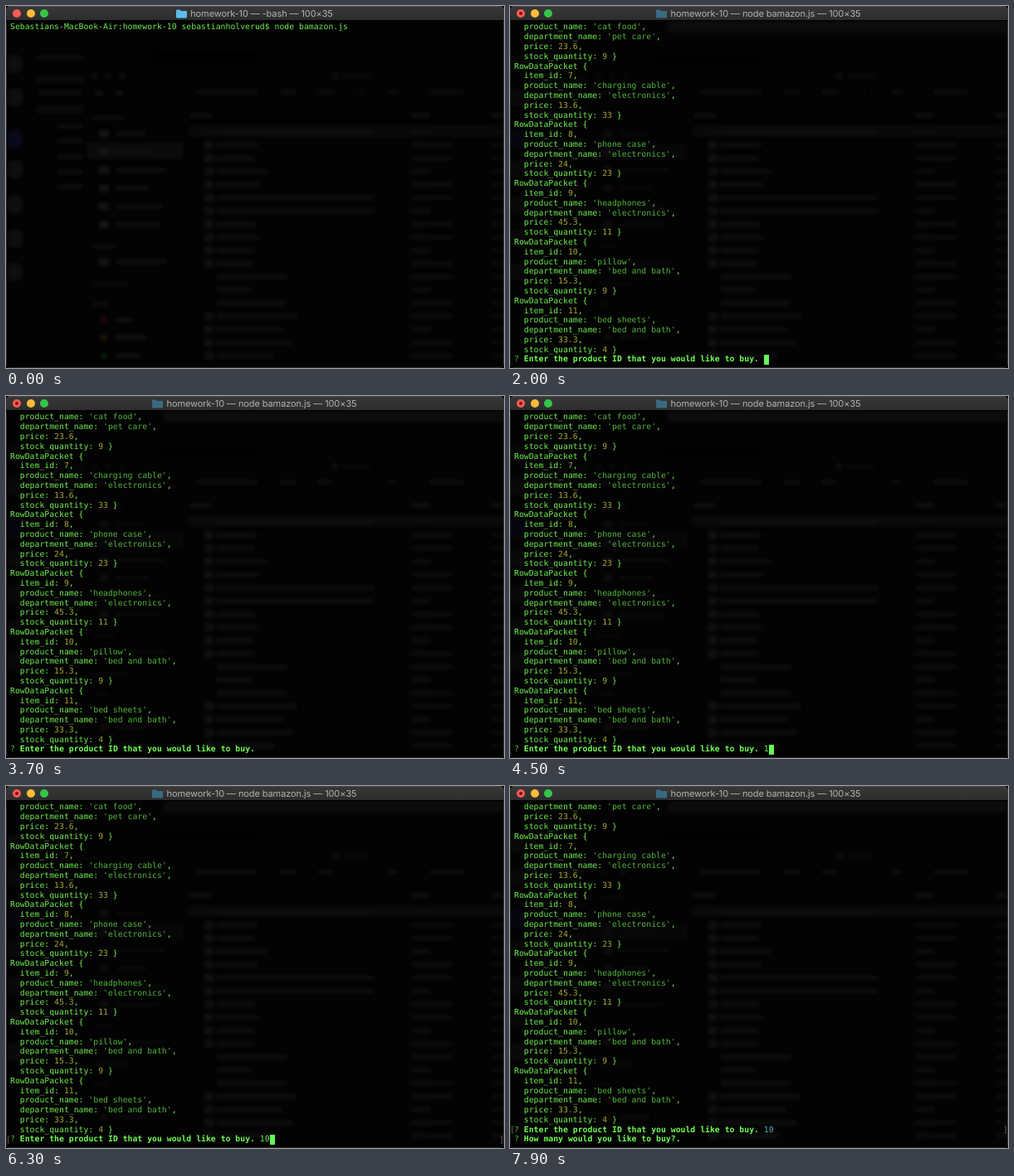
An HTML page that plays this animation: 600 by 437 pixels, repeating every 8000 ms.

```html
<!DOCTYPE html>
<html lang="en">
<head>
<meta charset="utf-8">
<title>Terminal</title>
<style>
  html, body { margin: 0; width: 100%; height: 100%; overflow: hidden; background: #000; }
  #win {
    position: absolute; left: 0; top: 0; width: 600px; height: 437px;
    box-sizing: border-box; overflow: hidden; background: #040304; border-radius: 5px;
  }
  #back { position: absolute; left: 0; top: 0; }
  #edge {
    position: absolute; inset: 0; box-sizing: border-box;
    border: 1px solid #282828; border-radius: 5px;
  }
  #bar {
    position: absolute; left: 0; top: 0; width: 600px; height: 17px;
    background: linear-gradient(#383838, #2d2d2d);
    box-shadow: inset 0 1px #484848, 0 1px #000;
  }
  #title {
    position: absolute; left: 0; right: 1px; top: 1px; height: 17px;
    display: flex; align-items: center; justify-content: center; gap: 4px;
    font: 11px/17px Inter, Roboto, sans-serif; letter-spacing: -.1px; color: #b0b0b0;
    white-space: pre; text-rendering: geometricPrecision;
  }
  .light { position: absolute; top: 3.5px; width: 10px; height: 10px; border-radius: 50%; }
  #dot { position: absolute; left: 3px; top: 3px; width: 4px; height: 4px; border-radius: 50%; background: #7a0a08; }
  #text, #cursor, .mark {
    position: absolute; margin: 0; white-space: pre;
    font: 9.8px/11.8px "DejaVu Sans Mono", "Liberation Mono", monospace;
    text-rendering: geometricPrecision; font-variant-ligatures: none;
  }
  #text { left: 5px; top: 20.4px; color: #6eea50; }
  #cursor { width: 6px; height: 12px; background: #66f858; }
  .mark { color: #666a60; }
  .s { color: #4fb43a; }
  .n { color: #a3a436; }
  .a { color: #4fb4b8; }
  b { color: #70fa54; }
</style>
</head>
<body>
<div id="win">
  <svg id="back" width="600" height="437">
    <filter id="blur" x="-5%" y="-5%" width="110%" height="110%" color-interpolation-filters="sRGB">
      <feGaussianBlur stdDeviation="2"/>
    </filter>
    <g id="left" filter="url(#blur)"></g>
    <g id="right" filter="url(#blur)" opacity=".6"></g>
    <rect id="band" x="190" y="17" width="410" height="15" fill="#0d0c0d" filter="url(#blur)"/>
  </svg>
  <pre id="text"></pre>
  <div id="cursor"></div>
  <div class="mark" style="left:0">[</div>
  <div class="mark" style="left:594px">]</div>
  <div id="edge"></div>
  <div id="bar">
    <div class="light" style="left:8px;background:#fc5b54"><div id="dot"></div></div>
    <div class="light" style="left:25px;background:#fdbc37"></div>
    <div class="light" style="left:41px;background:#35c648"></div>
    <div id="title">
      <svg width="13" height="11"><path id="folder" d="M0 1.5Q0 .5 1 .5H4.5L6 2H12Q13 2 13 3V9.5Q13 10.5 12 10.5H1Q0 10.5 0 9.5Z"/></svg>
      <span id="name"></span>
    </div>
  </div>
</div>
<script>
const LOOP = 8000, CELL = 5.9, ROW = 11.8, ROWS = 35, BLINK = 610;
const ENTER = 1200, TITLE = 1300, LIST = 1700, KEY1 = 4000, KEY2 = 4700, SEND = 6200, NEXT = 6800;
const WAKES = [190, ENTER, LIST, KEY1, KEY2, SEND, NEXT];
const $ = id => document.getElementById(id);
const marks = document.querySelectorAll('.mark');

// Dim, blurred file browser showing through the window
const rect = (x, y, w, h, c, r = 2) =>
  `<rect x="${x}" y="${y - h / 2}" width="${w}" height="${h}" rx="${r}" fill="${c}"/>`;
const smudge = (x, y, w, c = '#1b191b') => rect(x, y, w, 5, c);

function paintBack() {
  let l = '', r = '';
  [70, 110, 160, 197, 240, 281, 321].forEach((y, i) => l += rect(1, y, 19, 22, i == 2 ? '#0c0d24' : '#151415', 8));
  [62, 88, 105, 125, 145, 163, 182, 200, 218].forEach((y, i) =>
    l += smudge(i < 4 ? 37 : 62, y, i < 4 ? 56 - i % 2 * 12 : 31, '#141214'));
  [88, 125].forEach(y => l += rect(36, y, 58, 10, '#0e0d0e'));
  [107, 123, 140].forEach(x => l += rect(x - 4, 85, 8, 8, '#111', 4));
  l += rect(98, 175, 115, 19, '#101011') + rect(175, 64, 130, 20, '#000');
  l += smudge(107, 105, 11) + smudge(132, 105, 9);
  [135, 290, 336, 360].forEach((y, i) => l += smudge(104, y, [38, 28, 44, 20][i], '#121112'));
  [154, 175, 198, 220, 242, 264, 309].forEach((y, i) =>
    l += rect(112, y, 12, 9, '#1d1c1d') + smudge(132, y, [36, 42, 60, 40, 56, 54, 62][i], '#161516'));
  [379, 400, 422].forEach((y, i) =>
    l += rect(114, y, 8, 8, ['#2c1210', '#2a1c0c', '#10230f'][i], 4) + smudge(132, y, [20, 37, 30][i]));

  r += rect(392, 85, 9, 9, '#141314') + smudge(406, 85, 34, '#0f0e0f');
  [[224, 84], [325, 30], [370, 30], [420, 14], [455, 22], [505, 52]].forEach(([x, w]) =>
    r += smudge(x + 5, 104, w - 10, '#151415'));
  r += smudge(221, 132, 27) + smudge(488, 132, 22) + smudge(585, 132, 15);
  r += rect(220, 151, 380, 13, '#0f0e0f');
  const widths = [190, 50, 46, 62, 52, 190, 190, 48, 52, 46, 46, 86, 42, 84, 97, 80, 92, 70];
  widths.forEach((w, i) => {
    const y = 152 + i * 15.9;
    if (i < 11 || i > 13) r += rect(239, y, 11, 10, i ? '#1a191a' : '#121112');
    r += smudge(253, y, w, '#171617') + smudge(488, y, i % 3 ? 50 : 24, '#151415') + smudge(585, y, 15, '#121112');
  });
  $('left').innerHTML = l;
  $('right').innerHTML = r;
}

// Terminal contents
const str = s => `<span class="s">'${s}'</span>`;
const num = n => `<span class="n">${n}</span>`;
const ask = s => `<span class="s">?</span> <b>${s}</b> `;
const ITEMS = [
  [6, 'cat food', 'pet care', 23.6, 9],
  [7, 'charging cable', 'electronics', 13.6, 33],
  [8, 'phone case', 'electronics', 24, 23],
  [9, 'headphones', 'electronics', 45.3, 11],
  [10, 'pillow', 'bed and bath', 15.3, 9],
  [11, 'bed sheets', 'bed and bath', 33.3, 4],
];
const packets = ITEMS.flatMap(([id, name, dept, price, stock]) => [
  'RowDataPacket {',
  `  item_id: ${num(id)},`,
  `  product_name: ${str(name)},`,
  `  department_name: ${str(dept)},`,
  `  price: ${num(price)},`,
  `  stock_quantity: ${num(stock)} }`,
]);
const COMMAND = 'Sebastians-MacBook-Air:homework-10 sebastianholverud$ node bamazon.js ';
const ASK_ID = ask('Enter the product ID that you would like to buy.');
const ASK_COUNT = ask('How many would you like to buy?.');

// Lines, cursor cell and row of the bracket marks at time t
function screen(t) {
  if (t < LIST) {
    return t < ENTER ? { lines: [COMMAND], col: COMMAND.length, row: 0, mark: -1 }
                     : { lines: [COMMAND], col: 0, row: 1, mark: 0 };
  }
  const last = ROWS - 1;
  if (t >= NEXT) {
    const lines = [...packets, ASK_ID + '<span class="a">10</span>', ASK_COUNT];
    return { lines: lines.slice(-ROWS), col: 35, row: last, mark: last - 1 };
  }
  const typed = t < KEY1 ? '' : t < KEY2 ? '1' : '10';
  return {
    lines: [...packets, ASK_ID + typed].slice(-ROWS),
    col: 51 + typed.length, row: last, mark: t < SEND ? -1 : last,
  };
}

function cursorOn(t) {
  const wake = WAKES.filter(w => w <= t).pop();
  return wake !== undefined && Math.floor((t - wake) / BLINK) % 2 == 0;
}

let shown = '';
function draw(now) {
  const t = now % LOOP;
  const { lines, col, row, mark } = screen(t);
  const html = lines.join('\n');
  if (html != shown) $('text').innerHTML = shown = html;

  const cur = $('cursor').style;
  cur.left = 5 + col * CELL + 'px';
  cur.top = 19.8 + row * ROW + 'px';
  cur.visibility = cursorOn(t) ? 'visible' : 'hidden';
  marks.forEach(m => {
    m.style.visibility = mark < 0 ? 'hidden' : 'visible';
    m.style.top = 20.4 + mark * ROW + 'px';
  });

  // The window turns "edited": close button gets a dot, folder dims
  const k = Math.min(1, Math.max(0, Math.floor((t - 100) / 100) / 4));
  const mix = (a, b) => Math.round(a + (b - a) * k);
  $('dot').style.opacity = k;
  $('folder').setAttribute('fill', `rgb(${mix(92, 58)},${mix(190, 106)},${mix(234, 130)})`);
  const job = t < TITLE ? '-bash' : 'node bamazon.js';
  $('name').textContent = `homework-10 — ${job} — 100×35`;

  const listed = t >= LIST;
  $('left').setAttribute('opacity', listed ? 0.35 : 0.7);
  $('band').setAttribute('opacity', listed ? 1 : 0);
}

paintBack();
const start = performance.now();
(function tick() {
  draw(performance.now() - start);
  requestAnimationFrame(tick);
})();
</script>
</body>
</html>
```
